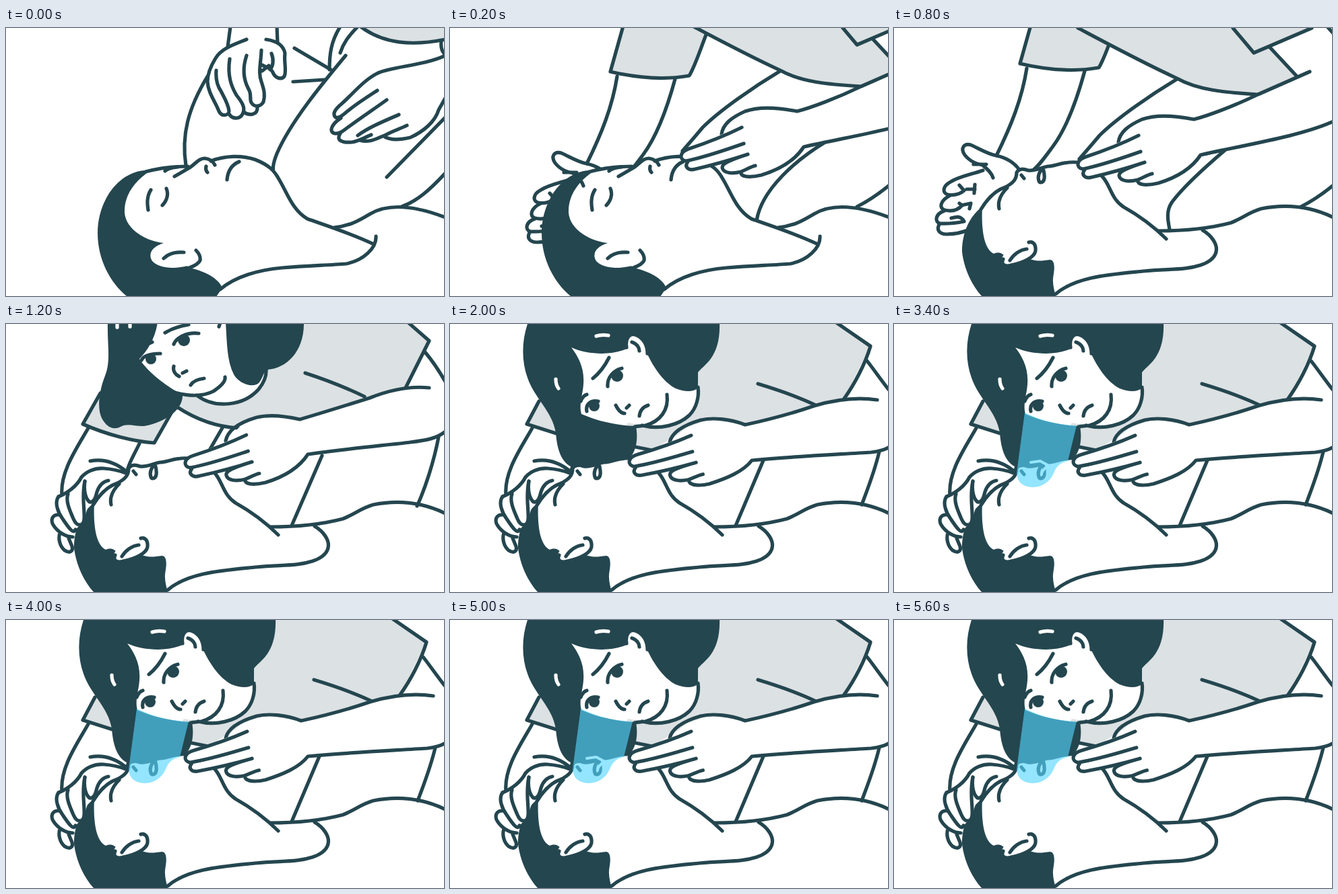
These frames come from a looping animation (650x399 px, 6600 ms). An HTML page:

```html
<!DOCTYPE html>
<html lang="en">
<head>
<meta charset="utf-8">
<title>Checking for breathing</title>
<style>
html, body { margin: 0; width: 100%; height: 100%; overflow: hidden; background: #fff; }
svg { display: block; width: 650px; height: 399px; }
path { fill: none; stroke: #24464f; stroke-width: 5.2; stroke-linecap: round; stroke-linejoin: round; }
.white { fill: #fff; stroke: none; }
.cloth { fill: #dce1e3; stroke: none; }
.dark { fill: #24464f; stroke: none; }
.shine { stroke: #fff; }
.step, .gaze, .breath { animation: 6600ms step-end infinite; }
.open { animation-name: open; }
.reach { animation-name: reach; }
.flat { animation-name: flat; }
.tilt { animation-name: tilt; }
.tilted { animation-name: tilted; }
.lean { animation-name: lean; }
.leaning { animation-name: leaning; }
.listen { animation-name: listen; }
.gaze { animation-name: gaze; fill: #54d6ff; stroke: none; }
.breath { animation-name: breath; stroke: #95e6ff; stroke-width: 4; }
@keyframes open { 0% { visibility: visible } 3.0303%, 100% { visibility: hidden } }
@keyframes reach { 0%, 12.1212%, 100% { visibility: hidden } 3.0303% { visibility: visible } }
@keyframes flat { 0% { visibility: visible } 12.1212%, 100% { visibility: hidden } }
@keyframes tilt { 0%, 18.1818%, 100% { visibility: hidden } 12.1212% { visibility: visible } }
@keyframes tilted { 0% { visibility: hidden } 12.1212%, 100% { visibility: visible } }
@keyframes lean { 0%, 30.303%, 100% { visibility: hidden } 18.1818% { visibility: visible } }
@keyframes leaning { 0% { visibility: hidden } 18.1818%, 100% { visibility: visible } }
@keyframes listen { 0% { visibility: hidden } 30.303%, 100% { visibility: visible } }
@keyframes gaze {
  0% { opacity: 0 } 33.3333% { opacity: .2 } 36.3636% { opacity: .41 } 39.3939%, 100% { opacity: .62 }
}
@keyframes breath {
  0%, 60.606%, 84.8484%, 100% { opacity: 0; transform: none }
  51.5151%, 75.7575% { opacity: 1; transform: none }
  54.5454%, 78.7878% { opacity: 1; transform: translate(5px, -25px) }
  57.5757%, 81.8181% { opacity: 1; transform: translate(10px, -51px) }
}
</style>
</head>
<body>
<svg viewBox="0 0 650 399">
<defs>
  <g id="fingers">
    <path class="white" d="M363 158L282 192L273 203L284 222L334 212L340 226L390 210Z"/>
    <path d="M363 160C335 174 308 184 284 192C270 197 270 208 280 210C310 204 340 193 366 184M283 211C277 219 284 225 294 222C320 216 348 208 372 200C350 207 333 213 334 220C336 229 350 229 362 226C371 222 378 218 383 217"/>
  </g>
  <g id="palm">
    <path d="M197 60C190 105 174 145 152 190M283 64C270 112 255 150 236 176C222 195 215 205 207 211"/>
    <path d="M118 203H137C126 206 112 198 105 189C98 179 104 171 114 174C127 180 140 188 152 190C166 193 178 200 186 211M130 203C140 211 145 216 147 223"/>
    <path d="M132 212C115 218 97 221 84 229C71 236 72 246 80 248C91 250 98 247 104 242L97 234M108 240H120M120 233L119 246"/>
    <path d="M84 249C69 256 66 268 75 271C88 274 96 270 101 264L97 261M100 264L114 261L112 269"/>
    <path d="M75 272C61 277 60 288 68 291C84 292 94 290 104 288C99 279 92 281 85 283M68 291C62 300 67 307 78 307C95 307 105 303 112 300"/>
    <path class="cloth" d="M206 -15L187 53C225 62 265 66 304 59C312 46 316 30 332 -15Z"/>
    <path d="M206 -15L187 53C225 62 265 66 304 59C312 46 316 32 332 -10"/>
  </g>
  <g id="torso">
    <path d="M420 76C380 100 330 135 305 160C290 178 282 187 275 195"/>
    <path class="cloth" d="M273 0C320 25 370 52 420 75C450 92 490 96 540 99L597 71L558 29L534 37L620 0Z"/>
    <path d="M273 0C320 25 370 52 420 75C450 92 490 96 540 99M503 0L534 37L620 0M558 29L597 71M643 -2L652 8"/>
  </g>
  <g id="arm">
    <path class="white" d="M617 65L540 99L445 136L390 131L368 136L333 170L362 229L455 189L650 140Z"/>
    <path d="M617 65L540 99C505 116 465 131 445 136C420 131 390 128 368 136C348 145 335 155 333 170M362 229C365 235 380 234 392 231C415 224 440 212 455 189C520 174 600 162 650 140"/>
    <use href="#fingers"/>
  </g>
</defs>

<!-- opening view -->
<g class="step open">
  <path d="M299 72C270 120 260 160 267 205M504 41C470 82 422 140 402 187C395 204 396 212 397 218M428 30L482 62M426 80L472 77"/>
  <path d="M496 -2C482 20 480 40 480 62M523 -3C507 13 500 24 496 37M646 20C645 28 647 35 651 39"/>
  <path class="cloth" d="M525 -3C560 24 603 27 652 17V-3Z"/>
  <path d="M525 -3C560 24 603 27 652 17"/>
  <path d="M652 41C620 56 575 57 552 67C530 78 515 98 499 112C488 121 484 128 489 133C494 135 498 131 503 127C518 114 534 104 551 93M497 134C482 144 479 155 488 157C497 158 502 151 510 146C529 132 547 120 565 107"/>
  <path d="M496 157C489 168 500 171 513 170C522 169 532 163 542 159M583 129C560 139 538 148 522 160M525 167C540 172 552 163 562 160C572 154 585 150 595 145M562 162C572 168 587 166 600 163C620 154 637 139 642 122L652 104"/>
  <path d="M565 222L652 133M587 266C610 258 630 240 652 216"/>
  <path d="M333 -2L329 28M402 -2L403 22M357 17C340 24 320 30 311 45C303 58 299 68 299 80C300 97 311 110 316 124C320 132 330 131 331 124C330 113 324 104 319 94C313 85 311 75 312 63"/>
  <path d="M332 46C328 72 335 88 342 100C350 110 355 118 352 126C348 137 336 136 331 128M373 119C373 130 360 131 353 125"/>
  <path d="M357 41C350 62 353 78 360 91C365 99 361 106 364 111C369 119 378 117 382 110C385 100 383 92 379 80C374 66 378 55 379 33M386 17C400 19 412 25 414 38C412 50 417 64 413 72C408 78 399 74 396 66C392 58 386 59 380 55M394 38C398 48 396 57 392 62M380 64L390 56"/>
</g>

<g class="step reach">
  <path d="M560 168C515 195 462 240 455 287M604 266C620 258 635 248 652 234"/>
  <use href="#palm" x="51" y="12"/>
  <use href="#torso" x="70" y="-12"/>
</g>

<!-- head lying flat -->
<g class="step flat">
  <path class="white" d="M210 214C230 208 250 206 272 206L295 195L340 190L385 202L405 225L447 284L546 322L505 351L320 387L180 330Z"/>
  <path d="M487 297C510 295 525 286 540 277C565 262 600 262 652 282"/>
  <path class="dark" d="M215 212C170 209 136 255 136 305C136 345 155 380 180 400H312L321 387C315 372 295 362 272 357L234 320C210 318 178 301 176 275C175 250 190 228 215 212Z"/>
  <path d="M207 214C230 208 250 206 270 206M236 213C240 209 245 208 255 207M250 221L274 207C283 200 287 194 295 194C303 195 308 200 310 204M304 198C325 190 350 189 370 196C390 204 398 212 405 225C417 245 425 271 447 284C475 294 510 305 546 322"/>
  <path d="M346 199C334 204 329 214 328 226M297 206C296 210 297 213 299 215M215 241C209 250 209 260 211 271M238 239C242 248 238 258 232 264"/>
  <path class="white" d="M234 320C220 325 212 332 215 343C218 352 230 356 245 357C262 357 280 353 286 346C290 338 270 320 234 320Z"/>
  <path d="M272 357C280 354 286 351 288 346C289 340 286 335 282 331M234 343C242 335 252 333 264 334"/>
  <path d="M318 389C340 370 375 360 410 357C450 354 480 353 505 351C530 346 550 328 549 310"/>
</g>
<use class="step reach" href="#arm" x="70" y="-12"/>

<!-- helper before leaning in -->
<g class="step tilt">
  <path d="M491 182C470 200 430 235 412 260C404 272 406 285 409 300M604 266C620 258 635 248 652 234"/>
  <use href="#palm"/>
  <use href="#torso"/>
</g>

<!-- helper leaning in -->
<g class="step leaning">
  <path d="M122 155C105 185 80 220 83 255M198 178C190 195 183 205 180 218"/>
</g>
<g class="step lean">
  <path d="M322 153L303 186M469 196L424 300M642 168C635 205 622 245 610 271M622 42C632 54 643 70 652 86"/>
  <path class="cloth" d="M140 103L114 149C150 165 190 175 220 177L250 124L253 123C280 141 310 153 345 155L372 139L436 142L540 110L593 95L628 25L596 -3H240Z"/>
  <path d="M140 103L114 149C150 165 190 175 220 177L250 124M253 123C280 141 310 153 345 155M596 -3L628 25L593 95M444 73C475 83 505 95 532 108"/>
  <path class="white" d="M225 -3C222 20 208 40 198 52C203 72 220 92 255 105L283 106C310 127 353 122 375 97C385 84 387 75 386 65L335 -3Z"/>
  <path class="dark" d="M151 -3C150 30 156 55 147 77C138 100 135 125 142 140C150 155 160 158 170 153C180 147 193 153 205 152C232 147 263 130 262 105C243 96 212 74 198 52C210 40 222 20 225 -3Z"/>
  <path class="dark" d="M326 -3C328 30 328 55 338 75C345 88 365 96 375 88C382 80 382 70 388 68C417 66 443 40 442 -3Z"/>
  <path d="M283 106C310 127 353 122 375 97C384 86 387 77 386 66M230 92C248 105 285 112 308 100C320 92 326 85 325 79"/>
  <path d="M204 33L217 27M236 13C246 7 258 3 271 1M201 54C204 47 213 44 229 44M249 30C253 20 268 12 286 14M249 63C247 70 252 76 257 78M262 73L268 70M274 91C278 84 286 82 294 81M316 4L318 -2"/>
  <circle cx="215" cy="52" r="8" fill="#24464f"/>
  <circle cx="264" cy="24" r="9" fill="#24464f"/>
  <path class="shine" d="M165 -2V5M184 -2V4"/>
</g>
<g class="step listen">
  <path d="M465 203L424 300M637 190C630 220 620 245 611 269M619 55C630 69 640 84 652 99"/>
  <path class="cloth" d="M132 115L114 149L165 166L190 100ZM270 183L300 188L345 160L438 150L540 122L585 111L624 33L572 -3H380L262 150Z"/>
  <path d="M132 115L114 149L158 163M275 183L300 188M572 -3L624 33C616 60 600 90 585 111M457 89C490 99 520 110 543 121"/>
  <path class="white" d="M180 35L262 25L280 15L340 80L368 85C371 108 366 125 355 136C340 150 312 158 285 151L195 134Z"/>
  <path class="dark" d="M116 -3C106 25 106 55 115 80C125 110 152 130 157 162C159 187 165 207 183 214C200 217 240 216 262 203C275 195 280 175 276 152C245 151 218 144 195 134C191 120 197 105 198 90C200 65 190 48 180 35C205 46 240 47 262 37C262 18 270 12 280 17C290 25 292 35 293 45C300 60 315 86 335 96C350 102 362 101 368 95V72C377 60 402 50 400 -3Z"/>
  <path class="white" d="M262 37C260 22 266 13 275 16C287 20 293 32 293 46Z"/>
  <path d="M262 35C260 22 266 13 275 16C287 20 293 32 293 44M270 27C277 29 281 35 281 40"/>
  <path d="M322 105C325 128 312 145 290 151C284 152 279 152 274 153M285 151C312 158 340 150 355 136C366 125 370 108 368 94"/>
  <path d="M236 50C230 62 222 73 212 81M234 93C233 80 242 69 255 66M194 115C196 110 199 106 203 105M203 130C201 120 208 113 220 115M246 121C250 129 254 133 259 133M262 125L266 121M281 137C282 128 288 123 294 121"/>
  <circle cx="248" cy="77" r="9" fill="#24464f"/>
  <circle cx="214" cy="122" r="8" fill="#24464f"/>
  <path class="shine" d="M217 18C223 16 229 16 235 17M157 82C157 88 158 92 161 96"/>
</g>

<!-- head tilted back -->
<g class="step tilted">
  <path class="white" d="M131 268L165 237L182 214L199 212L226 206L268 200L308 220L340 265L404 314L240 396L140 340Z"/>
  <path d="M392 302C430 302 470 298 500 290C520 282 525 275 545 269C580 262 615 264 652 282"/>
  <path class="dark" d="M131 266C112 280 101 305 101 333C104 360 117 385 131 400H240C238 390 234 380 237 366C239 352 237 346 232 345C222 346 215 348 205 345L165 340C160 335 156 333 148 336C135 330 129 305 131 266Z"/>
  <path d="M129 270C138 255 150 242 165 237C177 231 182 225 182 215C186 208 194 210 199 212C210 213 218 208 228 206C240 206 250 198 272 200M156 269C153 256 161 245 168 238"/>
  <path d="M218 212C212 220 214 230 218 230C224 229 224 221 222 212M189 219L193 224M308 220C321 232 321 253 340 266C365 280 385 295 404 314"/>
  <path class="white" d="M166 334C155 345 159 356 172 354C191 353 208 342 210 332C211 322 206 317 200 319Z"/>
  <path d="M162 344C158 352 165 356 174 353C191 350 208 342 210 332C211 322 206 317 200 319M172 346C178 336 188 330 197 329"/>
  <path d="M240 396C270 370 320 367 370 362C410 358 430 361 455 353C479 345 483 330 474 316C469 308 463 304 458 301"/>
</g>

<g class="step leaning">
  <path class="white" d="M78 257L112 228L145 215L178 220L152 233L135 250L124 265L116 290L110 299L103 306L98 335L86 335L70 295Z"/>
  <path d="M125 204C145 200 162 206 178 219M78 257C93 251 106 240 112 228C119 220 131 214 145 215C160 216 170 219 178 222M117 234C115 248 118 260 124 265C131 266 133 258 135 250C138 240 145 234 152 233"/>
  <path d="M92 253C88 264 95 278 100 290C105 302 115 302 116 290C117 275 112 258 117 234M78 257C71 266 78 282 84 290C92 302 100 314 103 306"/>
  <path d="M80 284C68 283 66 292 70 299C76 309 88 317 99 317M80 311C77 320 80 331 87 337C95 342 100 338 98 331L93 319"/>
</g>

<!-- arm with two fingers on the chin -->
<use class="step tilt" href="#arm"/>
<g class="step lean">
  <path class="white" d="M628 95L590 95L540 110L436 142L385 137L350 150L326 174L355 234L448 194L600 176L650 161Z"/>
  <path d="M628 95C600 92 570 98 540 110C505 121 470 132 436 142C410 136 388 135 372 139C345 147 329 158 326 174M355 234C358 240 373 239 385 236C408 229 433 217 448 194C510 185 570 180 600 176C625 173 640 170 652 160"/>
  <use href="#fingers" transform="translate(-7 4) rotate(.8 275 205)"/>
</g>
<g class="step listen">
  <path class="white" d="M634 113L590 112L540 122L438 150L385 142L350 154L326 176L355 235L448 203L625 191L650 184Z"/>
  <path d="M634 113C600 108 570 113 540 122C505 134 470 143 438 150C415 141 390 139 372 143C345 151 329 162 326 176M355 235C358 241 373 241 385 238C410 230 435 220 448 203C510 197 580 194 625 191C640 189 646 187 652 183"/>
  <use href="#fingers" transform="translate(-7 2) rotate(2.5 275 205)"/>
</g>

<path class="gaze" d="M194 132C220 145 250 151 271 151L258 204C247 206 241 212 237 222C231 236 219 243 205 243C191 242 183 236 182 222Z"/>
<path class="breath" d="M203 206L217 204L228 210C226 215 219 217 219 224"/>
</svg>
</body>
</html>
```
